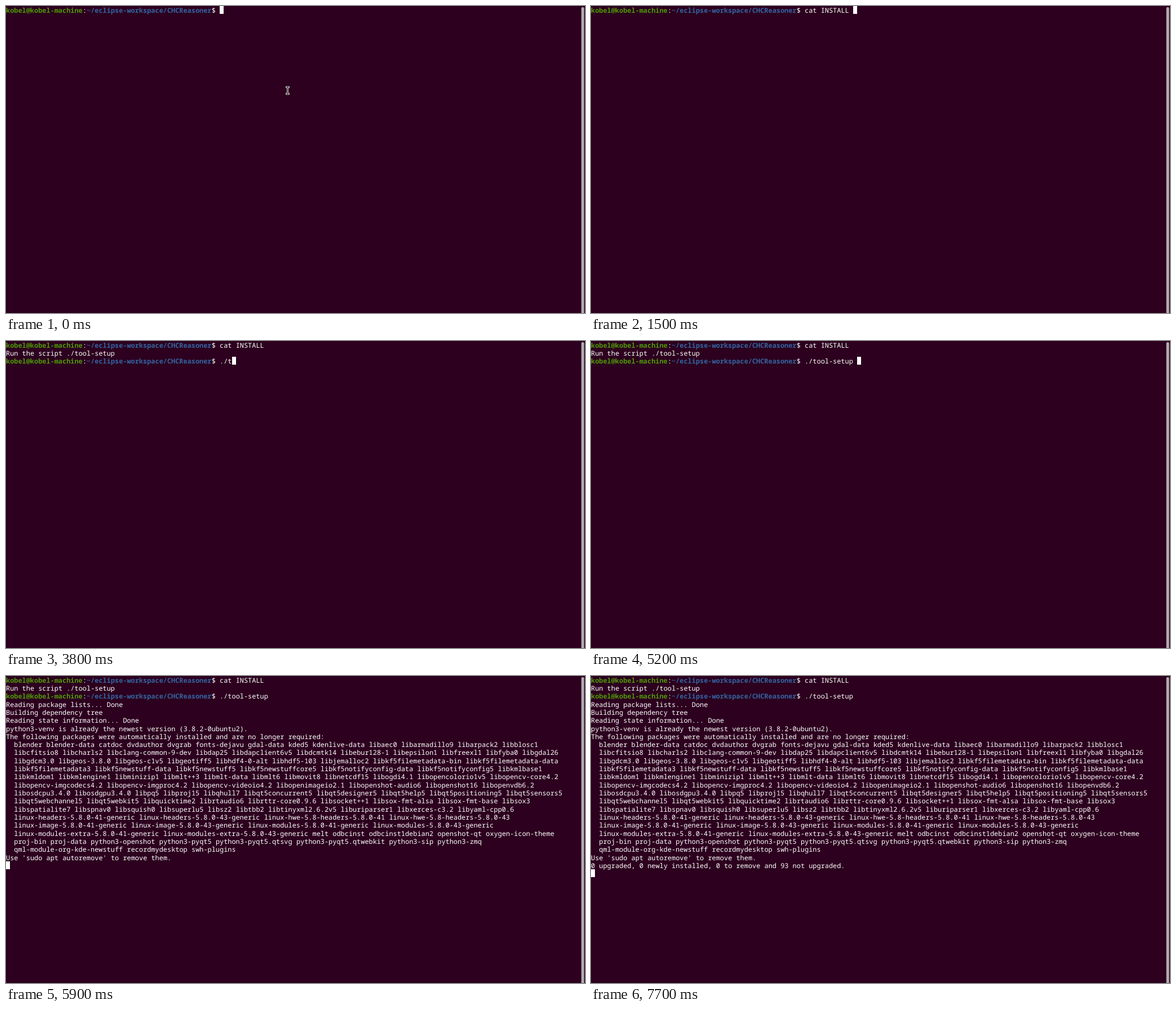
An HTML page with a canvas that plays this animation: 1027 px wide and 545 px high, repeating every 8 s.

```html
<!DOCTYPE html>
<html lang="en">
<head>
<meta charset="utf-8">
<title>Terminal session</title>
<style>
  html, body { margin: 0; width: 100%; height: 100%; overflow: hidden; background: #2c001e; }
  canvas { display: block; }
</style>
</head>
<body>
<canvas id="stage" width="1027" height="545"></canvas>
<script>
const ctx = document.getElementById('stage').getContext('2d');
const W = 1027, H = 545, LOOP = 8000;
const CELL_W = 7.152, CELL_H = 14.32, BASELINE = 11.6;
const FONT = '11.92px "Noto Sans Mono", "DejaVu Sans Mono", monospace';
const BG = '#2c001e', WHITE = '#ffffff', GREEN = '#4e9a06', BLUE = '#3465a4';

const USER = 'kobel@kobel-machine';
const DIR = '~/eclipse-workspace/CHCReasoner';
const PROMPT_LEN = USER.length + DIR.length + 3;

// Each key press: [time, characters shown]
const commands = [
  { row: 0, start: 0, text: 'cat INSTALL ',
    keys: [[600, 1], [700, 2], [800, 4], [1100, 5], [1200, 6], [1400, 7], [1500, 12]] },
  { row: 2, start: 2300, text: './tool-setup ',
    keys: [[3600, 1], [3800, 3], [4000, 4], [4100, 13]] }
];

const packages = `
  blender blender-data catdoc dvdauthor dvgrab fonts-dejavu gdal-data kded5 kdenlive-data libaec0 libarmadillo9 libarpack2 libblosc1
  libcfitsio8 libcharls2 libclang-common-9-dev libdap25 libdapclient6v5 libdcmtk14 libebur128-1 libepsilon1 libfreexl1 libfyba0 libgdal26
  libgdcm3.0 libgeos-3.8.0 libgeos-c1v5 libgeotiff5 libhdf4-0-alt libhdf5-103 libjemalloc2 libkf5filemetadata-bin libkf5filemetadata-data
  libkf5filemetadata3 libkf5newstuff-data libkf5newstuff5 libkf5newstuffcore5 libkf5notifyconfig-data libkf5notifyconfig5 libkmlbase1
  libkmldom1 libkmlengine1 libminizip1 libmlt++3 libmlt-data libmlt6 libmovit8 libnetcdf15 libogdi4.1 libopencolorio1v5 libopencv-core4.2
  libopencv-imgcodecs4.2 libopencv-imgproc4.2 libopencv-videoio4.2 libopenimageio2.1 libopenshot-audio6 libopenshot16 libopenvdb6.2
  libosdcpu3.4.0 libosdgpu3.4.0 libpq5 libproj15 libqhull7 libqt5concurrent5 libqt5designer5 libqt5help5 libqt5positioning5 libqt5sensors5
  libqt5webchannel5 libqt5webkit5 libquicktime2 librtaudio6 librttr-core0.9.6 libsocket++1 libsox-fmt-alsa libsox-fmt-base libsox3
  libspatialite7 libspnav0 libsquish0 libsuperlu5 libsz2 libtbb2 libtinyxml2.6.2v5 liburiparser1 libxerces-c3.2 libyaml-cpp0.6
  linux-headers-5.8.0-41-generic linux-headers-5.8.0-43-generic linux-hwe-5.8-headers-5.8.0-41 linux-hwe-5.8-headers-5.8.0-43
  linux-image-5.8.0-41-generic linux-image-5.8.0-43-generic linux-modules-5.8.0-41-generic linux-modules-5.8.0-43-generic
  linux-modules-extra-5.8.0-41-generic linux-modules-extra-5.8.0-43-generic melt odbcinst odbcinst1debian2 openshot-qt oxygen-icon-theme
  proj-bin proj-data python3-openshot python3-pyqt5 python3-pyqt5.qtsvg python3-pyqt5.qtwebkit python3-sip python3-zmq
  qml-module-org-kde-newstuff recordmydesktop swh-plugins`.split('\n').slice(1);

const output = [
  { row: 1, start: 2300, lines: ['Run the script ./tool-setup'] },
  { row: 3, start: 5400, lines: ['Reading package lists... Done'] },
  { row: 4, start: 5600, lines: ['Building dependency tree', 'Reading state information... Done'] },
  { row: 6, start: 5900, lines: [
    'python3-venv is already the newest version (3.8.2-0ubuntu2).',
    'The following packages were automatically installed and are no longer required:',
    ...packages,
    "Use 'sudo apt autoremove' to remove them."] },
  { row: 23, start: 6000, lines: ['0 upgraded, 0 newly installed, 0 to remove and 93 not upgraded.'] }
];

// Cursor row once the second command runs: [time, row]
const cursorRows = [[5300, 3], [5400, 4], [5600, 6], [5900, 23], [6000, 24]];
const cursorOff = [[300, 600], [2600, 3200], [4600, 5200], [6000, 6800], [7100, 7700]];

const latest = (steps, t, initial) =>
  steps.reduce((value, [start, next]) => t >= start ? next : value, initial);

// Places each word on the character grid
function write(text, row, col = 0, color = WHITE, bold = false) {
  ctx.font = (bold ? 'bold ' : '') + FONT;
  ctx.fillStyle = color;
  for (const word of text.matchAll(/\S+/g)) {
    ctx.fillText(word[0], (col + word.index) * CELL_W, row * CELL_H + BASELINE);
  }
}

function writePrompt(row) {
  const dirCol = USER.length + 1;
  write(USER, row, 0, GREEN, true);
  write(':', row, USER.length);
  write(DIR, row, dirCol, BLUE, true);
  write('$', row, dirCol + DIR.length);
}

function drawCursor(row, col) {
  const x = Math.round(col * CELL_W), y = Math.floor(row * CELL_H);
  ctx.fillStyle = WHITE;
  ctx.fillRect(x, y, 7, 14);
}

function drawPointer(x, y) {
  const beam = (color, width) => {
    ctx.strokeStyle = color;
    ctx.lineWidth = width;
    ctx.lineCap = 'square';
    ctx.beginPath();
    ctx.moveTo(x - 2, y - 6);
    ctx.lineTo(x + 2, y - 6);
    ctx.moveTo(x, y - 6);
    ctx.lineTo(x, y + 6);
    ctx.moveTo(x - 2, y + 6);
    ctx.lineTo(x + 2, y + 6);
    ctx.stroke();
  };
  beam('#e8e4e7', 2.8);
  beam('#101010', 1);
}

function drawScrollbar() {
  ctx.fillStyle = '#b3adb1';
  ctx.beginPath();
  ctx.roundRect(1020.5, 2, 5, H - 2, [2.5, 2.5, 0, 0]);
  ctx.fill();
}

function draw(t) {
  ctx.fillStyle = BG;
  ctx.fillRect(0, 0, W, H);
  drawScrollbar();

  let row = 0, col = 0;
  for (const cmd of commands) {
    if (t < cmd.start) continue;
    const typed = latest(cmd.keys, t, 0);
    writePrompt(cmd.row);
    write(cmd.text.slice(0, typed), cmd.row, PROMPT_LEN);
    row = cmd.row;
    col = PROMPT_LEN + typed;
  }
  for (const block of output) {
    if (t >= block.start) block.lines.forEach((line, i) => write(line, block.row + i));
  }

  if (t >= cursorRows[0][0]) {
    row = latest(cursorRows, t, row);
    col = 0;
  }
  if (!cursorOff.some(([from, to]) => t >= from && t < to)) drawCursor(row, col);
  if (t < 600) drawPointer(499.5, 150);
}

ctx.textRendering = 'geometricPrecision';
const begin = performance.now();
function tick() {
  draw((performance.now() - begin) % LOOP);
  requestAnimationFrame(tick);
}
tick();
</script>
</body>
</html>
```
